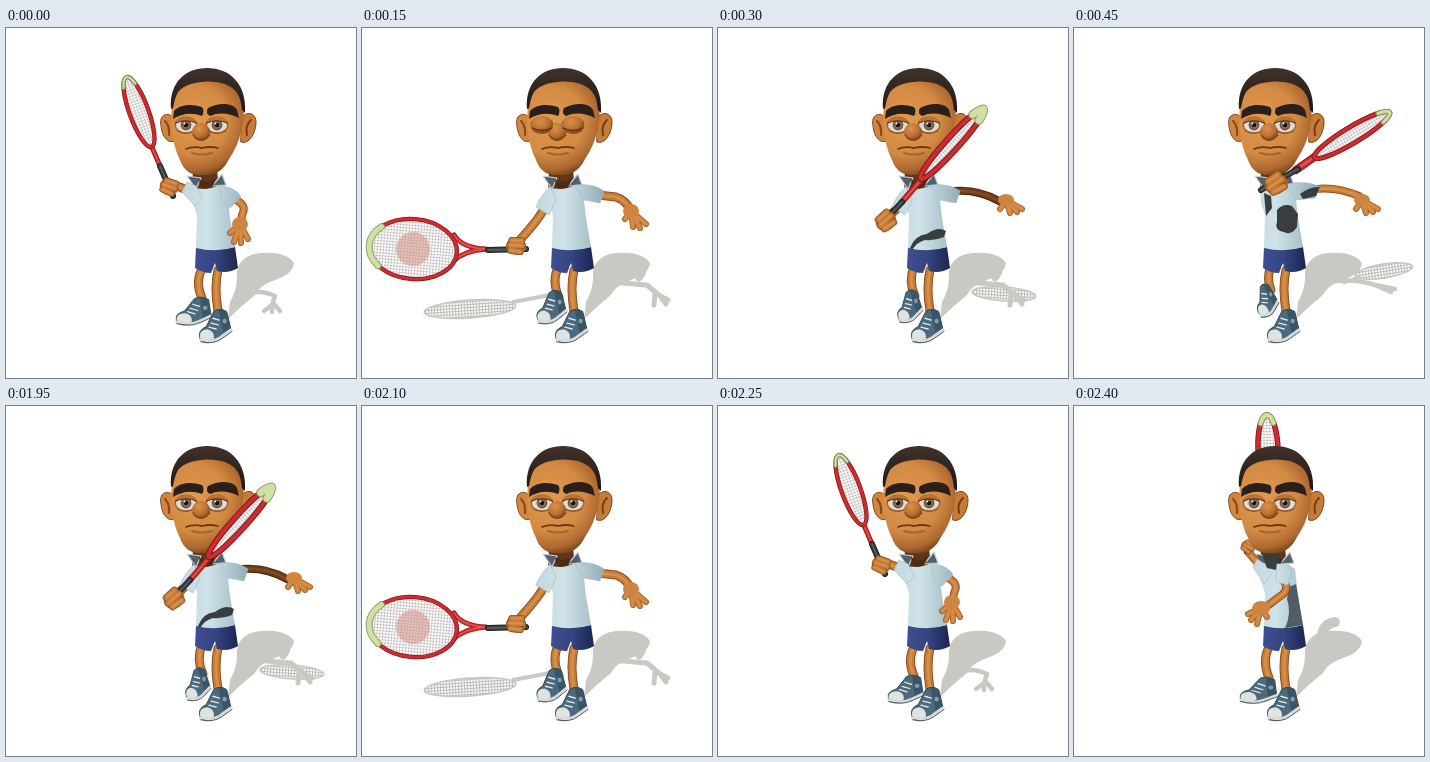
An HTML page that plays this animation: 350x350 px, repeating every 3 s.

```html
<!DOCTYPE html>
<html lang="en">
<head>
<meta charset="utf-8">
<title>Tennis swing</title>
<style>
html, body { margin: 0; width: 100%; height: 100%; overflow: hidden; background: #fff; }
svg { display: block; width: 100vw; height: 100vh; }
path { stroke-linecap: round; stroke-linejoin: round; }
.pose, .blink { opacity: 0; animation: 3s step-end infinite; }
.ready { animation-name: ready; }
.low { animation-name: low; }
.cross { animation-name: cross; }
.follow { animation-name: follow; }
.rest { animation-name: rest; }
.blink { animation-name: blink; }
@keyframes ready { 0%, 75% { opacity: 1 } 5%, 80%, 100% { opacity: 0 } }
@keyframes low { 0%, 10%, 75%, 100% { opacity: 0 } 5%, 70% { opacity: 1 } }
@keyframes cross { 0%, 15%, 70%, 100% { opacity: 0 } 10%, 65% { opacity: 1 } }
@keyframes follow { 0%, 65%, 100% { opacity: 0 } 15% { opacity: 1 } }
@keyframes rest { 0% { opacity: 0 } 80%, 100% { opacity: 1 } }
@keyframes blink { 0%, 10%, 100% { opacity: 0 } 5% { opacity: 1 } }
</style>
</head>
<body>
<svg id="stage" viewBox="0 0 350 350">
<defs>
  <radialGradient id="skin" gradientUnits="userSpaceOnUse" cx="188" cy="92" r="62">
    <stop offset="0" stop-color="#e09a50"/><stop offset=".55" stop-color="#d38a43"/>
    <stop offset=".8" stop-color="#ae6830"/><stop offset="1" stop-color="#54300f"/>
  </radialGradient>
  <radialGradient id="nose" cx=".4" cy=".3" r=".7">
    <stop offset="0" stop-color="#dc9049"/><stop offset=".6" stop-color="#bd7133"/><stop offset="1" stop-color="#7d4419"/>
  </radialGradient>
  <linearGradient id="hair" x2="0" y2="1">
    <stop offset="0" stop-color="#41322b"/><stop offset="1" stop-color="#1e1613"/>
  </linearGradient>
  <linearGradient id="cloth" gradientUnits="userSpaceOnUse" x1="175" x2="242">
    <stop offset="0" stop-color="#c3d8df"/><stop offset=".4" stop-color="#cfe2e8"/>
    <stop offset=".7" stop-color="#b3cad2"/><stop offset="1" stop-color="#92abb5"/>
  </linearGradient>
  <linearGradient id="denim">
    <stop offset="0" stop-color="#3f4e92"/><stop offset=".5" stop-color="#35447f"/><stop offset="1" stop-color="#1d2550"/>
  </linearGradient>
  <pattern id="strings" width="3" height="3" patternUnits="userSpaceOnUse">
    <path d="M0 0H3M0 0V3" stroke="#a9a4a1" stroke-width="1"/>
  </pattern>
  <pattern id="mesh" width="3" height="3" patternUnits="userSpaceOnUse">
    <path d="M0 0H3M0 0V3" stroke="#bdbdb8" stroke-width="2.2"/>
  </pattern>

  <g id="eye">
    <ellipse rx="11.5" ry="8.5" fill="#a8632c"/>
    <ellipse cy=".5" rx="10" ry="6.8" fill="#dedbd5"/>
    <circle r="5.4" fill="#6b5543"/>
    <circle r="3.8" fill="#8a725d"/>
    <circle r="2.3" fill="#17100c"/>
    <circle cx="-1.5" cy="-1.5" r=".9" fill="#fff"/>
    <path d="M-11-2C-8-10 8-10 11-2Q0-6-11-2Z" fill="#bd7233"/>
    <path d="M-10.5-2Q0-6.5 10.5-2" fill="none" stroke="#4d2911"/>
    <path d="M-9 6Q0 11 9 6" fill="none" stroke="#915021"/>
  </g>
  <g id="lid">
    <ellipse rx="11" ry="8.5" fill="url(#nose)"/>
    <path d="M-10 3Q0 8 10 3" fill="none" stroke="#5f3413" stroke-width="1.3"/>
  </g>
  <g id="head">
    <path d="M166 88C158 83 153 90 155 98C156 109 162 116 168 113Z" fill="#d08640" stroke="#84481b"/>
    <path d="M159 93Q164 98 163 107" fill="none" stroke="#854819" stroke-width="2"/>
    <path d="M236 89C242 82 250 86 250 94C250 105 243 117 235 114Z" fill="#c67c38" stroke="#7a421a"/>
    <path d="M245 92Q239 97 241 107" fill="none" stroke="#713c16" stroke-width="2"/>
    <path d="M167 72C163 94 166 116 174 132C178 144 187 148 197 147C207 148 217 144 223 131C234 115 240 94 237 72C230 46 173 46 167 72Z" fill="url(#skin)"/>
    <path d="M165 81C163 54 180 40 201 40C224 40 241 56 239 85L236 82C235 74 234 69 231 65C222 50 184 50 172 64C169 69 168 75 167 80Z" fill="url(#hair)"/>
    <use href="#eye" x="180" y="97"/><use href="#eye" x="211" y="97"/>
    <path d="M167 91L168 83C173 77 184 75 196 79Q199 83 196 88C185 84 175 86 167 91ZM202 80C214 74 227 75 231 82L233 90C223 85 213 84 204 88Q199 85 202 80Z" fill="#2a1f1a"/>
    <ellipse cx="195" cy="104" rx="9" ry="9" fill="url(#nose)"/>
    <path d="M187 107Q190 112 195 112T204 107" fill="none" stroke="#804419" stroke-width="1.2"/>
    <path d="M180 121Q187 118 196 120Q204 118 212 120" fill="none" stroke="#6b3915" stroke-width="1.8"/>
    <path d="M186 125Q196 128 206 125" fill="none" stroke="#a9642d" stroke-width="2"/>
  </g>
  <g id="lids"><use href="#lid" x="180" y="97"/><use href="#lid" x="211" y="97"/></g>

  <g id="sneaker">
    <path d="M-20 8Q-22 0-11-3L0-18Q8-22 15-16L17 4Q5 14-10 14Q-20 14-20 8Z" fill="#4c6a7d" stroke="#2c4352"/>
    <path d="M6-19Q11-20 15-16L17 4L8 8Z" fill="#3b5568"/>
    <path d="M-20 8Q-20-1-10 0Q-2 3-4 11Q-14 15-20 8Z" fill="#dfe3e2"/>
    <path d="M-20 10Q-6 16 5 10L17 4" fill="none" stroke="#d8dbd9" stroke-width="3"/>
    <path d="M-20 12.5Q-6 18 6 12L18 6" fill="none" stroke="#42515b"/>
    <path d="M-8-2L0 1M-5-6L3-3M-2-11L5-8" stroke="#e3e9ea" stroke-width="1.6"/>
    <circle cx="11" cy="-6" r="2.6" fill="#829bad"/>
  </g>
  <g id="body">
    <path d="M187 141H211L213 163H186Z" fill="#5f3617"/>
    <path d="M186 159Q200 164 213 157L221 163L224 190L229 219Q210 225 190 220L191 187L187 175Z" fill="url(#cloth)"/>
    <path d="M181 148L190 161L195 150ZM206 158L216 146L220 157Z" fill="#526069" stroke="#c3d6dc" stroke-width="1.2"/>
    <path d="M193 151Q201 158 210 150L207 158Q199 163 194 158Z" fill="#4e2b14"/>
  </g>
  <path id="shorts" d="M190 219Q210 224 229 219L232 240Q222 246 211 243L209 235L205 245Q196 245 189 240Z" fill="url(#denim)"/>
  <path id="bodyShade" d="M222 291L224 274Q231 262 231 249C230 232 243 225 258 225C273 224 286 229 288 236C285 249 269 251 262 255Q253 259 249 267L237 277Z" fill="#c9c8c3"/>
</defs>
</svg>
<script>
const tube = (d, w, dark, mid, light) =>
  [[w, dark], [w * .78, mid], [w * .3, light]].map(([width, color]) =>
    `<path d="${d}" fill="none" stroke="${color}" stroke-width="${width}"/>`).join('');
const limb = (d, w = 9) => tube(d, w, '#8a4e20', '#c67c38', '#d89049');
const shaded = (d, w = 9) => tube(d, w, '#42230e', '#6c3b18', '#83491f');
const grip = d => tube(d, 6, '#191b1d', '#33383b', '#555c60');
const sleeve = d => `<path d="${d}" fill="url(#cloth)" stroke="#a3bac3" stroke-width=".6"/>`;
const shade = (d, w = 7) => `<path d="${d}" fill="none" stroke="#c9c8c3" stroke-width="${w}"/>`;
const dark = d => `<path d="${d}" fill="#383d40"/>`;
const shoe = (x, y, angle, sx, sy = sx) =>
  `<use href="#sneaker" transform="translate(${x} ${y}) rotate(${angle}) scale(${sx} ${sy})"/>`;
const hand = (x, y, fingers, rx = 8, ry = 7) =>
  tube(fingers.map(([dx, dy]) => `M${x} ${y}l${dx} ${dy}`).join(''), 6, '#a05c27', '#cc823c', '#d89049') +
  `<ellipse cx="${x}" cy="${y}" rx="${rx}" ry="${ry}" fill="#cf853f"/>`;
const fist = (x, y, angle, size = 1.4) =>
  `<g transform="translate(${x} ${y}) rotate(${angle}) scale(${size})">
    <ellipse rx="8" ry="7" fill="#b56c2e"/>` + limb('M-4-4L4-5M-5 0L5-1M-4 4L4 4', 5.5) + '</g>';

// The far end of the racket head lies on the local -x axis.
function racket(x, y, rx, ry, angle, throat, { tip = 5, frame = 4.4, neck = 5, badge = 0 } = {}) {
  const arc = `M${-rx * .76} ${ry * .65}A${rx} ${ry} 0 0 1 ${-rx * .76} ${-ry * .65}`;
  return tube(throat, neck, '#8d1519', '#c62a2d', '#e5524f') +
    `<g transform="translate(${x} ${y}) rotate(${angle})">
      <ellipse rx="${rx}" ry="${ry}" fill="#fff"/>
      ${badge ? `<circle r="${badge}" fill="#f2bdb5"/>` : ''}
      <ellipse rx="${rx}" ry="${ry}" fill="url(#strings)"/>
      <ellipse rx="${rx}" ry="${ry}" fill="none" stroke="#8d1519" stroke-width="${frame}"/>
      <ellipse rx="${rx}" ry="${ry}" fill="none" stroke="#cd2d30" stroke-width="${frame * .64}"/>
      <path d="${arc}" fill="none" stroke="#8f9f68" stroke-width="${tip + 1}"/>
      <path d="${arc}" fill="none" stroke="#cfe0a2" stroke-width="${tip - 1}"/>
    </g>`;
}
const racketShade = (x, y, rx, ry, angle) =>
  `<ellipse cx="${x}" cy="${y}" rx="${rx}" ry="${ry}" transform="rotate(${angle} ${x} ${y})" fill="url(#mesh)" stroke="#c6c6c1" stroke-width="1.5"/>`;

const pose = (name, { ground, behind = '', leg, foot, arms, front = '' }) =>
  `<g class="pose ${name}">${ground}<use href="#bodyShade"/>${behind}` +
  limb(leg) + limb('M212 242Q208 259 212 283') + foot + shoe(210, 300, -8, .86, .92) +
  `<use href="#shorts"/><use href="#body"/>${arms}<use href="#head"/>` +
  (name === 'low' ? '<use class="blink" href="#lids"/>' : '') + front + '</g>';

const leftSleeve = sleeve('M188 159Q180 165 174 179L187 187L194 172Z');
const rightSleeve = sleeve('M213 157Q231 155 242 163L238 175L222 172Z');
const wideShade = shade('M250 254Q272 256 285 257L298 268M298 268L304 276M298 268L306 272M293 266L292 277', 5) +
  shade('M274 240Q286 239 277 250', 7);
const openHand = hand(269, 183, [[-6, 8], [2, 16], [9, 17], [15, 13]]);
const sideHand = hand(288, 172, [[-6, 9], [4, 13], [11, 12], [16, 9]], 8, 6);
const step = { leg: 'M196 238Q190 254 197 268', foot: shoe(192, 280, -14, .68, .9) };

document.getElementById('stage').insertAdjacentHTML('beforeend', [
  pose('ready', {
    ground: shade('M237 268Q252 260 269 268L266 277M266 277L258 283M266 277L266 284M268 276L274 283', 4.5),
    leg: 'M198 238Q188 252 196 270', foot: shoe(189, 285, -2, .94, .8),
    arms: limb('M187 164L168 157') + sleeve('M190 158L181 154L176 164L189 178L196 171Z') +
      limb('M227 171Q242 176 236 187L234 200', 8) + sleeve('M213 157Q231 160 235 169L224 180L216 173Z') +
      hand(234, 196, [[-10, 9], [-6, 18], [1, 19], [8, 15]]) +
      racket(133, 84, 37, 9.5, 70, 'M145 117L154 138', { tip: 3 }) +
      grip('M154 138L167 168') + fist(163, 159, 25, 1.2)
  }),
  pose('low', {
    ground: racketShade(108, 281, 46, 9, -4) + shade('M151 274L193 266', 4) + wideShade,
    leg: 'M197 238Q189 252 197 270', foot: shoe(190, 281, -10, .8, .92),
    arms: limb('M184 176Q181 187 156 214') + leftSleeve +
      limb('M236 167L254 169Q264 172 269 183') + rightSleeve + openHand +
      racket(51, 221, 44, 30, 5, 'M92 207Q100 220 124 221M90 234Q103 222 124 221', { tip: 6, badge: 17 }) +
      grip('M126 222L164 221') + fist(154, 218, 8, 1.25)
  }),
  pose('cross', {
    ground: racketShade(286, 266, 32, 7, 4) + wideShade, ...step,
    arms: limb('M184 176L170 189') + leftSleeve +
      shaded('M236 163Q260 161 281 173', 8) + rightSleeve + sideHand +
      dark('M192 220Q197 207 209 206Q220 198 228 203L226 209Q217 213 207 212Q199 214 194 222Z'),
    front: racket(234, 116, 47, 6.5, 132, 'M184 174L208 146', { tip: 8, frame: 6, neck: 6 }) +
      grip('M172 187L184 174') + fist(168, 193, -35, 1.35)
  }),
  pose('follow', {
    ground: racketShade(310, 243, 29, 7, -9) + shade('M255 254Q279 250 301 257L317 264M301 257L321 261', 4.5) + shade('M270 255L286 248', 3),
    leg: 'M197 238Q192 250 197 262', foot: shoe(193, 274, -25, .6, .9),
    arms: limb('M236 162Q259 157 285 168', 8) +
      sleeve('M213 156Q233 152 246 159L241 170L222 172Z') + sideHand +
      dark('M190 165L197 168L198 180L192 188ZM203 182Q209 175 218 178L224 186L223 199Q217 208 210 204Q200 202 203 194ZM226 166Q236 158 246 159L242 168L229 171Z'),
    front: racket(278, 107, 44, 8, 149, 'M222 142L246 125', { tip: 4, frame: 5, neck: 8 }) +
      grip('M187 162L224 141') + fist(202, 156, -28, 1.45)
  }),
  pose('rest', {
    ground: shade('M248 230Q249 218 261 216', 10),
    behind: racket(194, 43, 34, 10, 88, 'M190 76L184 125', { frame: 5.5 }) + grip('M184 120L173 146'),
    leg: 'M197 238Q187 252 195 272', foot: shoe(186, 286, 0, .98, .76),
    arms: limb('M188 162L175 147', 8) + fist(174, 141, 35, .9) +
      sleeve('M191 158L183 153L179 161L190 178L197 169Z') +
      dark('M188 148L206 149L202 164L193 162Z') +
      `<path d="M215 181L222 178L229 219L211 222Q218 207 213 193Z" fill="#515d65"/>` +
      limb('M209 174Q217 184 205 191L188 204', 8) +
      sleeve('M203 158Q216 156 218 167L214 179L202 176Z') +
      hand(187, 202, [[-13, 6], [-10, 12], [-4, 16], [6, 9]], 9, 7)
  })
].join(''));
</script>
</body>
</html>
```
